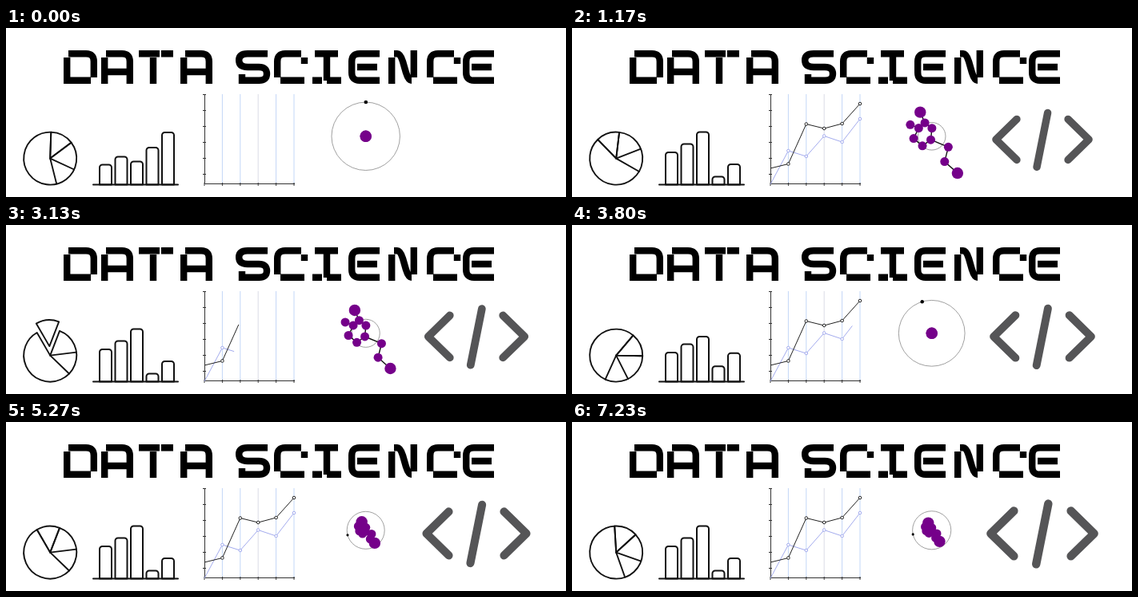
An HTML page with a canvas that plays this animation: 700x212 px, repeating every 7260 ms.

```html
<!DOCTYPE html>
<html lang="en">
<head>
<meta charset="utf-8">
<title>Data Science</title>
<style>
html, body { margin: 0; width: 100%; height: 100%; overflow: hidden; background: #fff; }
canvas { display: block; }
</style>
</head>
<body>
<canvas id="stage" width="700" height="212" role="img" aria-label="DATA SCIENCE"></canvas>
<script>
const LOOP = 7260, TAU = Math.PI * 2;
const g = document.getElementById('stage').getContext('2d');

const clamp = x => Math.min(1, Math.max(0, x));
const mix = (a, b, k) => a + (b - a) * k;
const ramp = (t, from, to) => clamp((t - from) / (to - from));
const smooth = (t, from, to) => (1 - Math.cos(Math.PI * ramp(t, from, to))) / 2;
const polar = (x, y, r, deg) => [x + r * Math.sin(deg * TAU / 360), y - r * Math.cos(deg * TAU / 360)];

function pen(color, width, cap = 'butt') {
  g.strokeStyle = color;
  g.lineWidth = width;
  g.lineCap = cap;
  g.lineJoin = cap === 'round' ? 'round' : 'miter';
}

function line(...points) {
  g.beginPath();
  points.forEach(p => g.lineTo(...p));
  g.stroke();
}

function disc(x, y, r, color) {
  g.beginPath();
  g.arc(x, y, r, 0, TAU);
  g.fillStyle = color;
  g.fill();
}

// Title: stencil letters with stepped corners
const glyphs = {
  D: 'M6 4.2H28Q37.8 4.2 37.8 14V34M4.2 9V42M4 37.8H34',
  A: 'M6 4.2H26Q35.8 4.2 35.8 14V42M4.2 9V42M8 27H34',
  T: 'M0 4.2H26M28 4.2H43M18 9V42',
  S: 'M40 4.2H15Q4.2 4.2 4.2 12.5T15 21H29Q39 21 39 29.5T29 37.8H8V30',
  C: 'M34 4.2H14Q4.2 4.2 4.2 14V34M8 37.8H38M38 9V17',
  I: 'M3 4.2H32M18 8V38M0 37.8H12M18 37.8H36',
  E: 'M39 4.2H14Q4.2 4.2 4.2 14V28Q4.2 37.8 14 37.8H39M11 21H36',
  N: 'M4.2 9V42M7 4.2H11Q15 4.2 18 14L22 28Q25 37.8 29 37.8M31.8 0V34'
};
const lefts = [72, 119, 166, 218, 287, 335, 383, 428, 478, 526, 571];
const title = [...'DATASCIENCE'].map((c, i) => [new Path2D(glyphs[c]), lefts[i]]);

function drawTitle() {
  pen('#000', 8.4);
  for (const [path, x] of title) {
    g.save();
    g.translate(x, 28);
    g.stroke(path);
    g.restore();
  }
}

// Pie: one full turn per cycle, then a slice slides out and back
function sector(x, y, from, to) {
  const turn = deg => (deg - 90) * TAU / 360;
  g.beginPath();
  g.moveTo(x, y);
  g.arc(x, y, 33, turn(from), turn(to));
  g.closePath();
  g.stroke();
}

function drawPie(t) {
  const x = 55.2, y = 163.6, cycle = LOOP / 2, p = (t + 330) % cycle;
  const spin = 360 * smooth(p, 0, 1720) - 30;
  const pop = 11.5 * (smooth(p, 2110, 2410) - smooth(p, 3500, cycle + 330));
  const early = 11.5 * (1 - smooth(p, -130, 330)) * (p < 330);
  const [a, b, c, d] = [0, 51, 113, 164].map(deg => deg + spin);
  pen('#111', 1.9, 'round');
  sector(x, y, b, a + 360);
  for (const deg of [c, d]) line([x, y], polar(x, y, 33, deg));
  sector(...polar(x, y, p < 330 ? early : pop, (a + b) / 2), a, b);
}

// Bars swing between two sets of heights
const lowBars = [25, 35, 29, 46.5, 65.5], highBars = [40.5, 51, 66, 10, 25.5];

function drawBars(t) {
  const p = t % 2000, k = smooth(p, 700, 1000) - smooth(p, 1700, 2000);
  pen('#111', 2, 'round');
  line([109, 196.5], [215, 196.5]);
  lowBars.forEach((low, i) => {
    const h = mix(low, highBars[i], k);
    g.beginPath();
    g.roundRect(117 + i * 19.5, 196.5 - h, 15, h, [3.5, 3.5, 0, 0]);
    g.stroke();
  });
}

// Line chart
const chartX = i => 248 + i * 22.4;
const blackY = [176, 170.5, 120.5, 126, 120, 95];
const blueY = [196, 154, 161, 135.5, 143, 114];

function series(ys, end, color) {
  if (end <= 0) return;
  const last = Math.floor(end), points = [];
  for (let i = 0; i <= last; i++) points.push([chartX(i), ys[i]]);
  if (last < 5) points.push([chartX(end), mix(ys[last], ys[last + 1], end - last)]);
  pen(color, 1);
  line(...points);
  for (let i = 1; i <= last; i++) {
    disc(chartX(i), ys[i], 1.8, '#fff');
    g.stroke();
  }
}

function drawChart(t) {
  const p = t % 2750;
  for (let i = 1; i < 6; i++) {
    pen(i === 3 ? '#d9dbe6' : '#c3d7f7', 1);
    line([chartX(i), 83], [chartX(i), 195]);
  }
  pen('#333', 1);
  line([248.5, 83], [248.5, 195.5], [361, 195.5]);
  for (let i = 0; i < 6; i++) {
    line([246, 83.5 + i * 20], [250, 83.5 + i * 20]);
    line([chartX(i), 194], [chartX(i), 198]);
  }
  series(blueY, 5 * ramp(p, 0, 1150), '#a3abee');
  series(blackY, 5 * smooth(p, 50, 830), '#222');
}

// Molecule unfolds node by node inside a breathing orbit, then folds up again
const ORBIT = 1946, cx = 449.7, cy = 135.8;
const nodes = '423,80 402,110 435,107 423,119 450,120 416,140 448,142 434,152 476,153 469,174 486,188'
  .split(' ').map(s => s.split(',').map(Number));
const bonds = '0-2 1-3 2-3 2-4 3-5 5-7 7-6 6-4 6-8 8-9 9-10'.split(' ').map(s => s.split('-'));

function drawMolecule(t) {
  const p = t % ORBIT, phase = p / ORBIT;
  const r = 29.5 + 13.5 * Math.cos(phase * TAU - 0.2);
  const placed = nodes.map(([x, y], i) => {
    const k = smooth(p, 150 + 18 * i, 360 + 18 * i) * (1 - ramp(p, 900 + 23 * i, 1490));
    return [mix(cx, x, k), mix(cy, y, k)];
  });
  pen('#777', 0.7);
  g.beginPath();
  g.arc(cx, cy, r, 0, TAU);
  g.stroke();
  disc(...polar(cx, cy, r, phase * 360), 0.6 + r * 0.04, '#000');
  pen('#111', 1.4);
  for (const [a, b] of bonds) line(placed[a], placed[b]);
  placed.forEach(([x, y], i) => disc(x, y, i % 10 ? 5.5 : 7.2, '#75008a'));
}

// Code symbol, growing slowly
function drawCode(t) {
  if (t < 30) return;
  const s = 0.98 + t * 1.85e-5;
  g.save();
  g.translate(588, 139.9);
  g.scale(s, s);
  pen('#555557', 9.4, 'round');
  for (const side of [-1, 1]) line([side * 32, -25.5], [side * 58, 0], [side * 32, 25.5]);
  line([6.6, -33.5], [-7, 34.5]);
  g.restore();
}

const start = performance.now();
function frame() {
  const t = (performance.now() - start) % LOOP;
  g.fillStyle = '#fff';
  g.fillRect(0, 0, 700, 212);
  drawTitle();
  for (const draw of [drawPie, drawBars, drawChart, drawMolecule, drawCode]) draw(t);
  requestAnimationFrame(frame);
}
frame();
</script>
</body>
</html>
```
